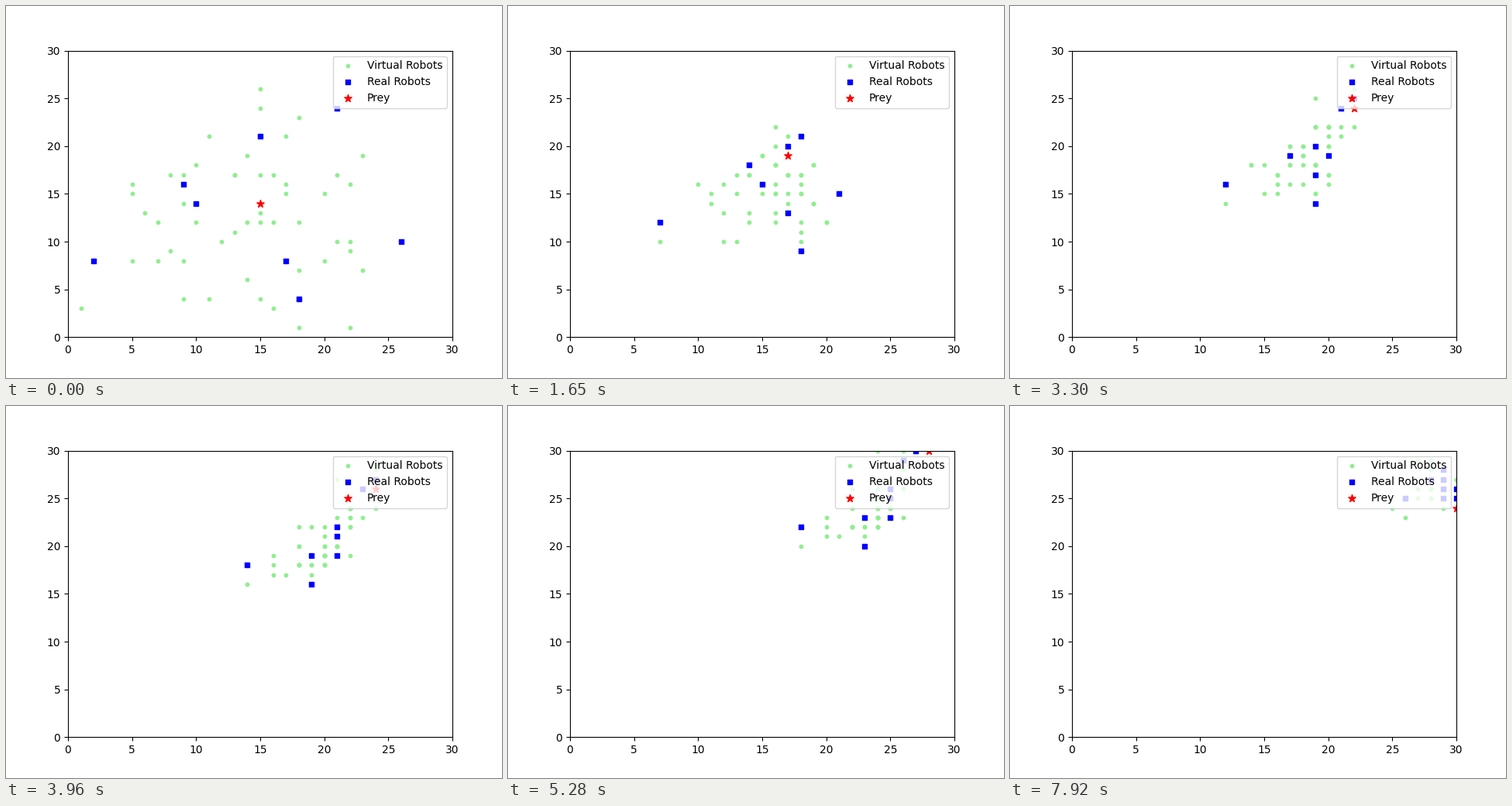
These frames come from a looping animation (640 px wide and 480 px high, 8000 ms). A matplotlib script:

```python
from itertools import combinations

import matplotlib.pyplot as plt
import numpy as np
from matplotlib.animation import FuncAnimation

LOOP, TICK, HOLD = 8000, 40, 330   # ms
SIZE = 30
STEPS = LOOP // HOLD + 1

# Prey: straight up, diagonal to the top wall, along it, then down the side
PREY_KEYS = [0, 3, 16, 18, 24]
PREY = [(15, 14), (15, 17), (28, 30), (30, 30), (30, 24)]

# Real robots gather along these key points, then chase by rule
GATHER_KEYS = [0, 3, 7, 12]
GATHER = [
    [(2, 8), (5, 11), (9, 14), (14, 18)],
    [(9, 16), (12, 16), (15, 19), (19, 19)],
    [(10, 14), (13, 14), (17, 18), (21, 22)],
    [(15, 21), (15, 18), (19, 22), (24, 27)],
    [(17, 8), (17, 11), (17, 15), (21, 19)],
    [(18, 4), (18, 7), (18, 11), (19, 16)],
    [(21, 24), (18, 21), (18, 21), (23, 26)],
    [(26, 10), (23, 13), (19, 17), (21, 21)],
]
PAIRS = np.array(list(combinations(range(len(GATHER)), 2)))


def cell_on(path, keys, step):
    """Grid cell reached on a path of key points."""
    return np.round([np.interp(step, keys, axis) for axis in zip(*path)])


def chase(robots, prey):
    """One cell towards the prey, nearest first, one robot per cell."""
    cells = robots.copy()
    gaps = np.abs(prey - cells).max(axis=1)
    for i in np.argsort(gaps, kind="stable"):
        if gaps[i] <= 1:
            continue
        d = prey - cells[i]
        goal = cells[i] + np.sign(d) * (np.abs(d) > gaps[i] / 3)
        if not (cells == goal).all(axis=1).any():
            cells[i] = goal
    return cells


prey = [cell_on(PREY, PREY_KEYS, s) for s in range(STEPS)]
real = []
for s in range(STEPS):
    if s <= GATHER_KEYS[-1]:
        real.append(np.array([cell_on(p, GATHER_KEYS, s) for p in GATHER]))
    else:
        real.append(chase(real[-1], prey[s]))

# Virtual robots: one between each pair, looser copies, and strays
LOOSE = np.repeat([0, 1, 1.6], [len(PAIRS), len(PAIRS[::2]), len(GATHER)])
NOISE = np.random.default_rng(7).normal(size=(len(LOOSE), 2))


def virtual(step):
    mid = real[step][PAIRS].mean(axis=1)
    homes = np.vstack([mid, mid[::2], real[step]])
    spread = LOOSE + 3 * np.exp(-step ** 2 / 3)   # wide at first
    return np.clip(np.round(homes + NOISE * spread[:, None]), 0, SIZE)


fig, ax = plt.subplots(figsize=(6.4, 4.8), dpi=100)
ax.set_xlim(0, SIZE)
ax.set_ylim(0, SIZE)

dots = ax.scatter([], [], c="lightgreen", s=10, label="Virtual Robots")
squares = ax.scatter([], [], c="blue", s=20, marker="s", label="Real Robots")
star = ax.scatter([], [], c="red", s=50, marker="*", label="Prey")
ax.legend(loc="upper right")


def draw(i):
    step = (i * TICK + TICK - 1) // HOLD
    dots.set_offsets(virtual(step))
    squares.set_offsets(real[step])
    star.set_offsets(prey[step])
    return dots, squares, star


anim = FuncAnimation(fig, draw, frames=LOOP // TICK, interval=TICK,
                     repeat=True, repeat_delay=0, blit=False)
plt.show()
```
